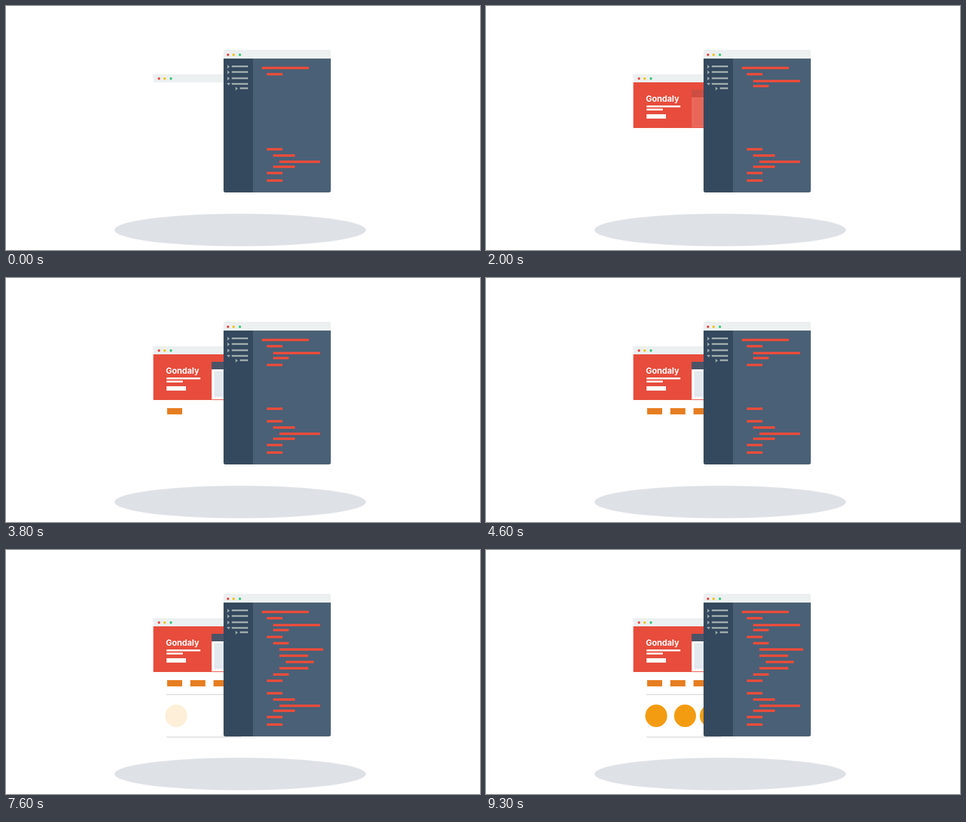
These frames come from a looping animation (756 px wide and 390 px high, 9400 ms). An HTML page:

```html
<!DOCTYPE html>
<html lang="en">
<head>
<meta charset="utf-8">
<title>Code and preview</title>
<style>
html, body { margin: 0; width: 100%; height: 100%; overflow: hidden; background: #fff; }
svg { display: block; width: 100%; height: 100%; }
.red { fill: #e74c3c; }
.yellow { fill: #f1c40f; }
.green { fill: #2ecc71; }
.bar { fill: #ecf0f1; }
.white { fill: #fff; }
.tree { fill: #98a5a8; }
.tab { fill: #e67e22; }
.disc { fill: #f39c12; }
.rule { fill: #e2e3e5; }
.title { fill: #fff; font: 700 13px Inter, "Open Sans", sans-serif; }

/* Every part shares one 9.4 s loop; code lines snap in, page parts fade in 100 ms steps */
.a { animation: 9.4s step-end infinite; }
.type1 { animation-name: type1; }
.type2 { animation-name: type2; }
.type3 { animation-name: type3; }
.type4 { animation-name: type4; }
.type5 { animation-name: type5; }
.type6 { animation-name: type6; }
.hero { animation-name: hero; }
.copy { animation-name: copy; }
.panel { animation-name: panel; }
.tab1 { animation-name: tab1; }
.tab2 { animation-name: tab2; }
.tab3 { animation-name: tab3; }
.disc1 { animation-name: disc1; }
.disc2 { animation-name: disc2; }
.disc3 { animation-name: disc3; }

@keyframes type1 { 0% { opacity: 0 } 6.382%, 100% { opacity: 1 } }
@keyframes type2 { 0% { opacity: 0 } 34.042%, 100% { opacity: 1 } }
@keyframes type3 { 0% { opacity: 0 } 49.999%, 100% { opacity: 1 } }
@keyframes type4 { 0% { opacity: 0 } 56.382%, 100% { opacity: 1 } }
@keyframes type5 { 0% { opacity: 0 } 62.765%, 100% { opacity: 1 } }
@keyframes type6 { 0% { opacity: 0 } 74.467%, 100% { opacity: 1 } }

@keyframes hero {
  0% { opacity: 0 }
  12.765% { opacity: 0; animation-timing-function: steps(6, start) }
  19.148%, 100% { opacity: 1 }
}
@keyframes copy {
  0% { opacity: 0 }
  19.148% { opacity: 0; animation-timing-function: steps(2, start) }
  21.276%, 100% { opacity: 1 }
}
@keyframes panel {
  0% { opacity: 0 }
  21.276% { opacity: 0; animation-timing-function: steps(6, start) }
  27.659%, 100% { opacity: 1 }
}
@keyframes tab1 {
  0% { opacity: 0 }
  35.106% { opacity: 0; animation-timing-function: steps(6, start) }
  41.489%, 100% { opacity: 1 }
}
@keyframes tab2 {
  0% { opacity: 0 }
  41.489% { opacity: 0; animation-timing-function: steps(6, start) }
  47.872%, 100% { opacity: 1 }
}
@keyframes tab3 {
  0% { opacity: 0 }
  47.872% { opacity: 0; animation-timing-function: steps(2, start) }
  49.999%, 100% { opacity: 1 }
}
@keyframes disc1 {
  0% { opacity: 0 }
  80.851% { opacity: 0; animation-timing-function: steps(6, start) }
  87.233%, 100% { opacity: 1 }
}
@keyframes disc2 {
  0% { opacity: 0 }
  87.233% { opacity: 0; animation-timing-function: steps(6, start) }
  93.616%, 100% { opacity: 1 }
}
@keyframes disc3 {
  0% { opacity: 0 }
  93.616% { opacity: 0; animation-timing-function: steps(6, start) }
  100% { opacity: 1 }
}
</style>
</head>
<body>
<svg viewBox="0 0 756 390">
  <defs>
    <g id="dots">
      <circle class="red" r="2"/>
      <circle class="yellow" cx="9" r="2"/>
      <circle class="green" cx="19" r="2"/>
    </g>
    <path id="arrow" d="M0-3 4 0 0 3z"/>
    <clipPath id="frame"><rect x="347" y="70" width="171" height="228" rx="3"/></clipPath>
  </defs>

  <ellipse cx="373.5" cy="358" rx="200.5" ry="26" fill="#dee1e6"/>

  <!-- Preview window -->
  <path class="bar" d="M235 122v-10q0-3 3-3h112v13z"/>
  <use href="#dots" x="244" y="116"/>
  <rect class="a hero red" x="235" y="122" width="115" height="73"/>
  <g class="a copy white">
    <text class="title" x="255" y="153">Gondaly</text>
    <rect x="256" y="159" width="54" height="3"/>
    <rect x="256" y="164" width="26" height="3"/>
    <rect x="256" y="173" width="31" height="7"/>
  </g>
  <g class="a panel">
    <rect class="white" x="328" y="134" width="22" height="60"/>
    <rect x="328" y="134" width="22" height="12" fill="#4a5466"/>
    <rect x="332" y="149" width="18" height="41" fill="#e3e9ee"/>
  </g>
  <rect class="a tab1 tab" x="257" y="208" width="24" height="10"/>
  <rect class="a tab2 tab" x="294" y="208" width="24" height="10"/>
  <rect class="a tab3 tab" x="331" y="208" width="24" height="10"/>
  <rect class="a type3 rule" x="256" y="230" width="119" height="2"/>
  <rect class="a type4 rule" x="256" y="298" width="119" height="2"/>
  <ellipse class="a disc1 disc" cx="271.5" cy="265" rx="17.5" ry="18"/>
  <ellipse class="a disc2 disc" cx="317.5" cy="265" rx="17.5" ry="18"/>
  <ellipse class="a disc3 disc" cx="358.5" cy="265" rx="17.5" ry="18"/>

  <!-- Editor window -->
  <g clip-path="url(#frame)">
    <rect class="bar" x="347" y="70" width="171" height="14"/>
    <rect x="347" y="84" width="47" height="214" fill="#34495e"/>
    <rect x="394" y="84" width="124" height="214" fill="#4a6076"/>
  </g>
  <use href="#dots" x="354" y="78"/>
  <g class="tree">
    <use href="#arrow" x="353" y="97"/>
    <use href="#arrow" x="353" y="106"/>
    <use href="#arrow" x="353" y="116"/>
    <path d="M352 123h6l-3 4z"/>
    <use href="#arrow" x="366" y="132"/>
    <path d="M360 95h26v3h-26zM360 104h26v3h-26zM360 114h26v3h-26zM360 123h26v3h-26zM373 130h13v3h-13z"/>
  </g>
  <g class="red">
    <path d="M408 97h75v4h-75zM416 107h25v4h-25zM416 227h25v4h-25zM426 237h35v4h-35z
      M436 247h65v4h-65zM426 255h35v4h-35zM416 265h25v4h-25zM416 277h25v4h-25z"/>
    <path class="a type1" d="M426 118h75v4h-75zM426 126h25v4h-25z"/>
    <path class="a type2" d="M416 137h25v4h-25zM416 207h25v4h-25z"/>
    <path class="a type3" d="M426 147h25v4h-25zM426 197h25v4h-25z"/>
    <path class="a type4" d="M436 157h70v4h-70z"/>
    <path class="a type5" d="M436 167h46v4h-46zM436 187h46v4h-46z"/>
    <path class="a type6" d="M446 177h45v4h-45z"/>
  </g>
</svg>
</body>
</html>
```
